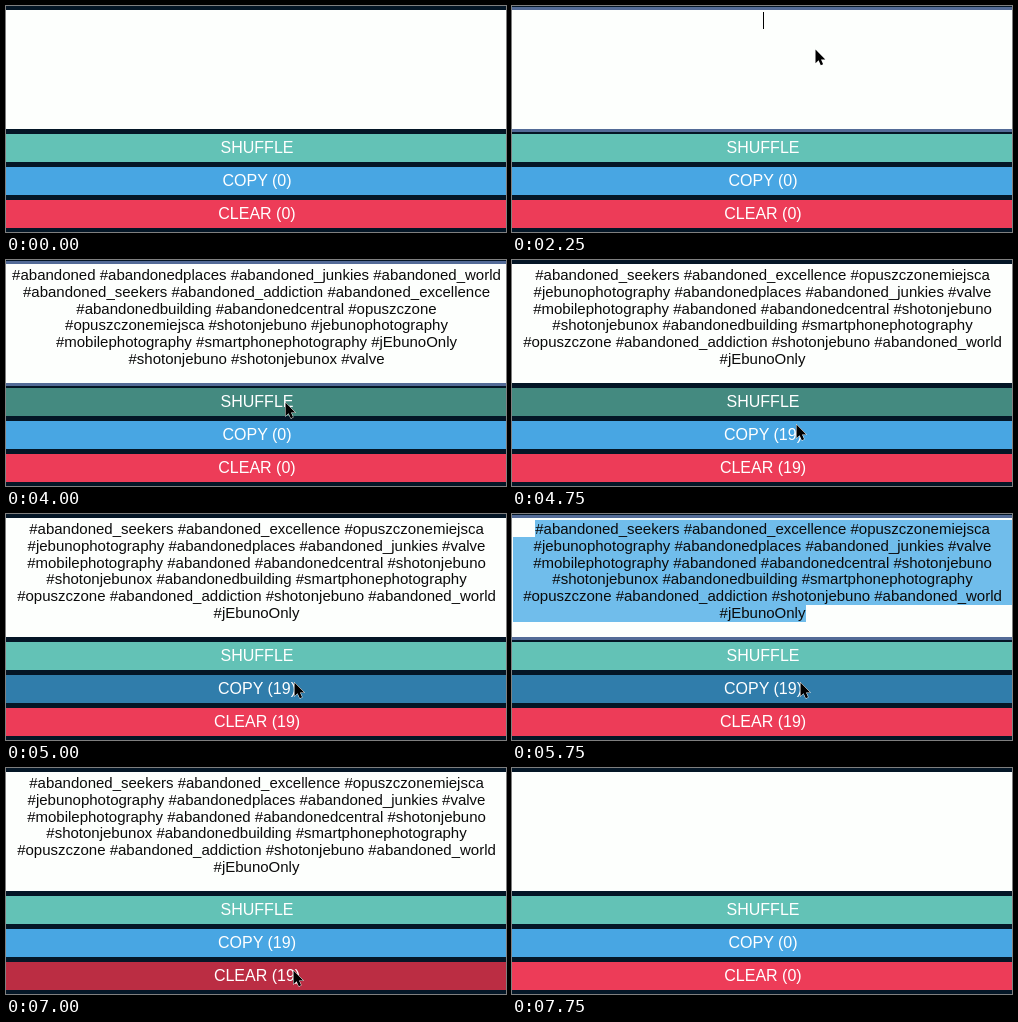
Write an HTML page that moves like this. It is 500 by 226 pixels and loops after 9.25 s.

```html
<!DOCTYPE html>
<html lang="en">
<head>
<meta charset="utf-8">
<title>Tag shuffler</title>
<style>
  html, body { margin: 0; width: 100%; height: 100%; overflow: hidden; background: #041626; }
  svg { display: block; width: 500px; height: 226px; }
  text { font-family: "Liberation Sans", Arial, sans-serif; text-anchor: middle; white-space: pre; }
  #tags text { font-size: 15px; fill: #0a0a0a; }
  #buttons text { font-size: 16px; fill: #fff; }
</style>
</head>
<body>
<svg viewBox="0 0 500 226">
  <rect width="500" height="226" fill="#041626"/>
  <rect id="focus" y="1" width="500" height="125" fill="#536b97"/>
  <rect y="4" width="500" height="119" fill="#fdfffd"/>
  <path id="selection" d="M23 6H500V91H294V108H1V23H23Z" fill="#70bdeb"/>
  <g id="tags"></g>
  <rect id="caret" width="1" height="17" fill="#000"/>
  <g id="buttons"></g>
  <path id="pointer" d="M.5 .5V14.2L3.6 11.3L5.8 16.3L8.1 15.3L6 10.4H10.3Z"
        fill="#000" stroke="#fff" stroke-width="1" stroke-linejoin="round" paint-order="stroke"/>
</svg>
<script>
const LOOP = 9250;
const LINE_BASES = [20, 37, 54, 70, 87, 104];

const TAGS = {
  none: [],
  pasted: [
    "#abandoned #abandonedplaces #abandoned_junkies #abandoned_world",
    "#abandoned_seekers #abandoned_addiction #abandoned_excellence",
    "#abandonedbuilding #abandonedcentral #opuszczone",
    "#opuszczonemiejsca #shotonjebuno #jebunophotography",
    "#mobilephotography #smartphonephotography #jEbunoOnly",
    "#shotonjebuno #shotonjebunox #valve"
  ],
  shuffled: [
    "#abandoned_seekers #abandoned_excellence #opuszczonemiejsca",
    "#jebunophotography #abandonedplaces #abandoned_junkies #valve",
    "#mobilephotography #abandoned #abandonedcentral #shotonjebuno",
    "#shotonjebunox #abandonedbuilding #smartphonephotography",
    "#opuszczone #abandoned_addiction #shotonjebuno #abandoned_world",
    "#jEbunoOnly"
  ]
};

const BUTTONS = [
  { name: "shuffle", y: 128, color: "#63c2b6", hover: "#448a80", label: () => "SHUFFLE" },
  { name: "copy", y: 161, color: "#48a6e3", hover: "#307dab", label: n => `COPY (${n})` },
  { name: "clear", y: 194, color: "#ed3c58", hover: "#bb2d43", label: n => `CLEAR (${n})` }
];

const START = { pointer: null, focus: false, caret: null, tags: "none", selected: false, hover: "", count: 0 };
const CARET_END = [379, 91];

// Each step changes only the listed parts of the state.
const STEPS = [
  [0, {}],
  [500, { pointer: [337, 34] }],
  [750, { pointer: [304, 44] }],
  [1000, { pointer: [303, 43] }],
  [2250, { focus: true, caret: [251, 6] }],
  [2500, { tags: "pasted", caret: CARET_END }],
  [3000, { caret: null }],
  [3250, { pointer: [300, 51] }],
  [3500, { pointer: [294, 105], caret: CARET_END }],
  [3750, { pointer: [279, 142], hover: "shuffle" }],
  [4000, { caret: null }],
  [4250, { focus: false, tags: "shuffled", count: 19 }],
  [4750, { pointer: [284, 164] }],
  [5000, { pointer: [288, 168], hover: "copy" }],
  [5750, { focus: true, selected: true }],
  [6000, { pointer: [287, 172] }],
  [6250, { pointer: [287, 204], hover: "clear" }],
  [6750, { pointer: [287, 202] }],
  [7000, { focus: false, selected: false }],
  [7250, { tags: "none", count: 0 }],
  [7500, { pointer: null }],
  [7750, { hover: "" }]
];

let running = START;
const STATES = STEPS.map(([time, change]) => ({ time, state: running = { ...running, ...change } }));

const byId = id => document.getElementById(id);

function add(parent, tag, attrs) {
  const node = document.createElementNS("http://www.w3.org/2000/svg", tag);
  for (const key in attrs) node.setAttribute(key, attrs[key]);
  return parent.appendChild(node);
}

const show = (node, visible) => node.setAttribute("visibility", visible ? "visible" : "hidden");

function place(node, point) {
  show(node, point);
  if (point) node.setAttribute("transform", `translate(${point})`);
}

const lines = LINE_BASES.map(y => add(byId("tags"), "text", { x: 250.5, y }));
for (const b of BUTTONS) {
  b.box = add(byId("buttons"), "rect", { y: b.y, width: 500, height: 28 });
  b.text = add(byId("buttons"), "text", { x: 251, y: b.y + 19 });
}

function draw(state) {
  show(byId("focus"), state.focus);
  show(byId("selection"), state.selected);
  place(byId("caret"), state.caret);
  place(byId("pointer"), state.pointer);
  lines.forEach((line, i) => line.textContent = TAGS[state.tags][i] || "");
  for (const b of BUTTONS) {
    b.box.setAttribute("fill", state.hover === b.name ? b.hover : b.color);
    b.text.textContent = b.label(state.count);
  }
}

const origin = performance.now();
let shown = null;

function tick() {
  const time = (performance.now() - origin) % LOOP;
  const { state } = STATES.findLast(step => step.time <= time);
  if (state !== shown) draw(shown = state);
  requestAnimationFrame(tick);
}
tick();
</script>
</body>
</html>
```
